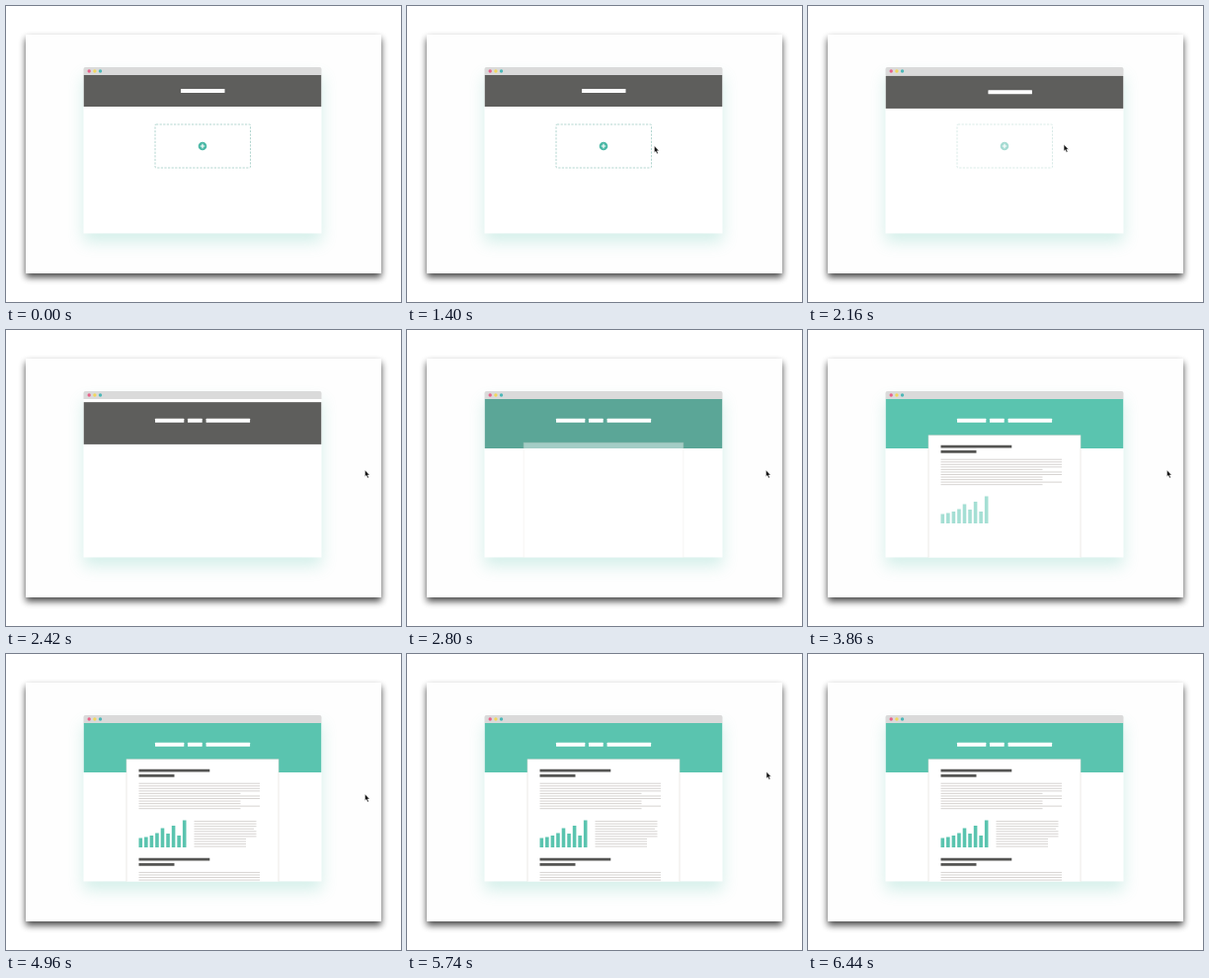
Recreate the animation shown at these times as an HTML page. Size 400 by 300 pixels, loop 6460 ms.

```html
<!DOCTYPE html>
<html lang="en">
<head>
<meta charset="utf-8">
<title>Page builder</title>
<style>
  html, body { margin: 0; width: 100%; height: 100%; overflow: hidden; background: #fff; }
  svg { display: block; width: 400px; height: 300px; }
</style>
</head>
<body>
<svg viewBox="0 0 400 300">
  <defs>
    <filter id="soft" x="-20%" y="-20%" width="140%" height="140%"><feGaussianBlur stdDeviation="3.8"/></filter>
    <filter id="glow" x="-20%" y="-20%" width="140%" height="140%"><feGaussianBlur stdDeviation="8"/></filter>
    <clipPath id="stageClip"><rect x="20" y="29" width="360" height="242"/></clipPath>
    <clipPath id="pageClip"><rect x="78.5" y="70" width="241" height="160.5"/></clipPath>
  </defs>

  <rect x="20" y="33" width="360" height="242" fill="#000" opacity=".72" filter="url(#soft)"/>
  <rect x="20" y="29" width="360" height="242" fill="#fefefe"/>

  <g clip-path="url(#stageClip)">
    <rect x="78.5" y="72" width="241" height="167" fill="#5ac4af" opacity=".26" filter="url(#glow)"/>
    <rect x="78.5" y="66" width="241" height="164.5" fill="#fff"/>
    <path d="M78.5 70V64q0-2 2-2H317.5q2 0 2 2V70z" fill="#dadada"/>
    <circle cx="84.2" cy="66" r="1.7" fill="#e8628a"/>
    <circle cx="89.9" cy="66" r="1.7" fill="#f1d75c"/>
    <circle cx="95.5" cy="66" r="1.7" fill="#4cb8b8"/>

    <g clip-path="url(#pageClip)">
      <rect id="header" x="78.5" width="241"/>
      <rect id="title" width="44.5" height="4" rx=".5" fill="#fff"/>
      <g id="extraTitle" fill="#fff">
        <rect x="151" y="89.8" width="29.3" height="4" rx=".5"/>
        <rect x="184" y="89.8" width="14.7" height="4" rx=".5"/>
      </g>
      <g id="dropZone">
        <rect x="151" y="120" width="96.5" height="44" rx="1" fill="none" stroke="#b3d6d0" stroke-dasharray="2.2 1.4"/>
        <circle cx="199" cy="142" r="4.3" fill="#4bb8a6"/>
        <path d="M196.7 142h4.6M199 139.7v4.6" stroke="#fff" stroke-width="1.2"/>
      </g>
      <rect id="card" height="140" fill="#fff" stroke="#dfdad5" stroke-width=".6"/>
      <g id="content"></g>
    </g>

    <path id="cursor" d="M0 0V6.6L1.5 5.3 2.6 7.9 3.8 7.4 2.7 4.9H4.7z" fill="#111" stroke="#fff" stroke-width=".4"/>
  </g>
</svg>
<script>
const LOOP = 6460;
const GRAY = [94, 94, 92], TEAL = [90, 196, 175];
const $ = id => document.getElementById(id);
const set = (node, attrs) => {
  for (const name in attrs) node.setAttribute(name, attrs[name]);
};
const mix = (a, b, p) => a + (b - a) * p;
const ramp = (t, from, to) => Math.min(1, Math.max(0, (t - from) / (to - from)));
const smooth = p => p * p * (3 - 2 * p);
const cubicOut = p => 1 - (1 - p) ** 3;
const cubicInOut = p => p < .5 ? 4 * p ** 3 : 1 - 4 * (1 - p) ** 3;

const heading = y => ({
  d: `M134.5 ${y}H206.3v2.8H134.5zM134.5 ${y + 5.2}H170.5v2.8H134.5z`, fill: '#555553'
});
const paragraph = (x, y, ends) => ({
  d: ends.map((end, i) => `M${x} ${y + i * 2.55}H${end}`).join(''),
  fill: 'none', stroke: '#d2cfcc', 'stroke-width': .9
});
const bars = heights => ({
  d: heights.map((h, i) => `M${134.5 + i * 5.55} 196v${-h}h3.6v${h}z`).join(''),
  fill: '#5ac4af'
});

// Each part of the article fades in between its two times.
const blocks = [
  [3380, 3560, heading(116.7)],
  [3480, 3720, paragraph(134.5, 131.2, [257, 257, 257, 257, 237.5, 257, 257, 237.5, 237.5, 257, 237.5])],
  [3720, 3980, bars([9.5, 10.5, 12, 14.5, 19.5, 14, 22, 12, 27.5])],
  [4000, 4240, paragraph(190.5, 169.6, [253.5, 253.5, 253.5, 251, 253.5, 253.5, 253.5, 243, 243, 243, 243])],
  [4180, 4420, heading(206.8)],
  [4360, 4600, paragraph(134.5, 221.4, [257, 257, 257, 257])]
].map(([from, to, attrs]) => {
  const node = document.createElementNS('http://www.w3.org/2000/svg', 'path');
  set(node, attrs);
  $('content').append(node);
  return { from, to, node };
});

function cursorAt(t) {
  if (t < 2060) {
    const p = cubicInOut(ramp(t, 930, 1630)), q = 1 - p;
    return [mix(370, 231, p), 51 * q * q + 2 * 155 * p * q + 140 * p * p];
  }
  if (t < 5500) {
    const p = smooth(ramp(t, 2060, 2400));
    return [mix(231, 363.5, p), mix(140, 142, p)];
  }
  const p = ((t - 5500) / 520) ** 2;
  return [363.5 + 2.5 * Math.min(1, p), 142 - 105 * p];
}

function draw(t) {
  const center = mix(86, 95, smooth(ramp(t, 2060, 2480)));
  const height = mix(32, 50, smooth(ramp(t, 2060, 2700)));
  const tint = ramp(t, 2560, 2900);
  set($('header'), {
    y: center - height / 2, height,
    fill: `rgb(${GRAY.map((c, i) => Math.round(mix(c, TEAL[i], tint)))})`
  });

  const shift = smooth(ramp(t, 2060, 2400));
  set($('title'), { x: mix(177, 202.6, shift), y: mix(84, 89.8, shift) });
  set($('extraTitle'), { opacity: ramp(t, 2200, 2400) });
  set($('dropZone'), { opacity: 1 - ramp(t, 2060, 2260) });

  const rise = cubicOut(ramp(t, 2680, 3360));
  const width = mix(168, 154, rise);
  set($('card'), { x: 199 - width / 2, y: mix(120, 106.8, rise), width, opacity: rise });

  for (const { from, to, node } of blocks) set(node, { opacity: ramp(t, from, to) });

  const [x, y] = cursorAt(t);
  set($('cursor'), { transform: `translate(${x} ${y})`, opacity: ramp(t, 930, 1000) });
}

function tick() {
  draw(performance.now() % LOOP);
  requestAnimationFrame(tick);
}
tick();
</script>
</body>
</html>
```
